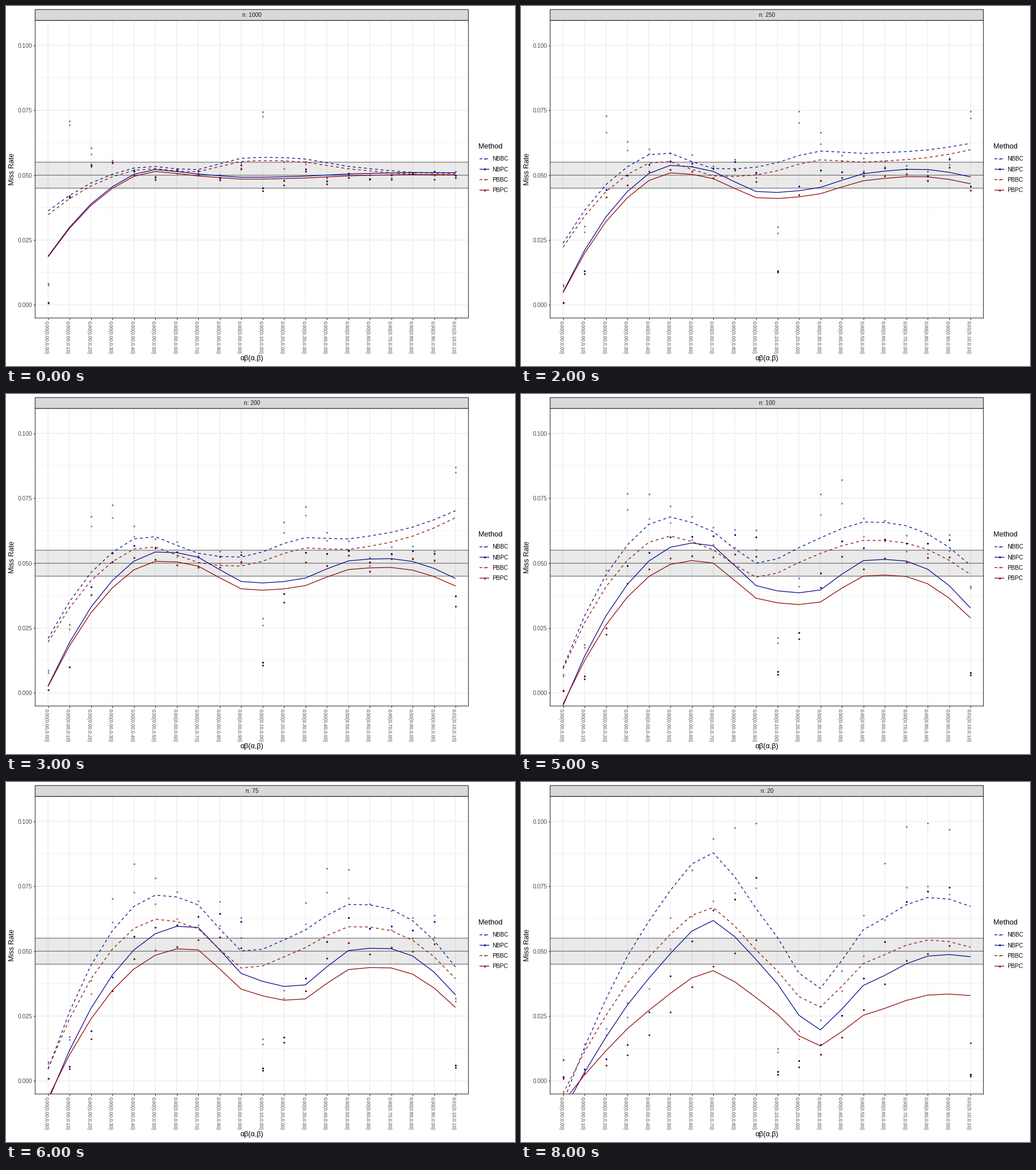
Animation of 890x629 px, one loop 9000 ms. Source, as a matplotlib script:

```python
import numpy as np
import matplotlib.pyplot as plt
from matplotlib.animation import FuncAnimation
from matplotlib.lines import Line2D
from matplotlib.patches import Rectangle

W, H, DPI = 890, 629, 100
PT = 72 / DPI  # points per pixel
LEFT, RIGHT, TOP, BOTTOM = 51.0, 808.5, 25.2, 545.1
GREY = "#333333"
plt.rcParams["font.family"] = "Liberation Sans"
plt.rcParams["path.snap"] = False

# name: colour, nonparametric bootstrap, bias corrected
METHODS = {
    "NBBC": ("#00008B", True, True),
    "NBPC": ("#00008B", True, False),
    "PBBC": ("#8B0000", False, True),
    "PBPC": ("#8B0000", False, False),
}
SIZES = [1000, 500, 250, 200, 150, 100, 75, 50, 20]
REPS = 5000

STEPS = np.arange(10) / 10
ALPHA = np.r_[np.zeros(10), STEPS[1:], 0.1]
BETA = np.r_[STEPS, np.zeros(9), 0.1]
BOTH = ALPHA * BETA > 0
X = np.arange(len(ALPHA))


def bump(z, height, centre, width):
    return height / (1 + ((z - centre) / width) ** 2)


def miss_rate(n, nonparam, corrected):
    """Expected rate: a logistic rise with effect strength, then a plateau.

    Bias correction adds a hump where the effect is just detectable.
    """
    z = np.where(BOTH, 1.28 * n * ALPHA * BETA, np.sqrt(n) * (ALPHA + BETA))
    plateau = 0.05 * (1 + (18 if nonparam else 3) / (n + 10))
    rate = plateau / (1 + np.exp(-1.75 * (z - 2.2)))
    if corrected:
        height = 0.0295 if nonparam else 0.0275
        rate += np.where(BOTH, bump(z, 0.062, 2.1, 0.96),
                         bump(z, height, 3, 1.7))
    return rate


KNOTS = np.array([-0.095, 2, 4, 7, 9, 12, 14, 17, 19.095])


def loess(y, span=0.75):
    """Local quadratic fits at the knots, blended by cubic Hermite pieces."""
    q = int(span * len(X))
    level, slope = [], []
    for k in KNOTS:
        d = np.abs(X - k)
        w = np.clip(1 - (d / np.sort(d)[q - 1]) ** 3, 0, 1) ** 1.5
        _, b, a = np.polyfit(X - k, y, 2, w=w)
        level.append(a)
        slope.append(b)
    level, slope = np.array(level), np.array(slope)
    i = np.searchsorted(KNOTS, X, side="right") - 1
    h = KNOTS[i + 1] - KNOTS[i]
    t = (X - KNOTS[i]) / h
    return (level[i] * (1 + 2 * t) * (1 - t) ** 2
            + level[i + 1] * t * t * (3 - 2 * t)
            + h * slope[i] * t * (1 - t) ** 2
            + h * slope[i + 1] * t * t * (t - 1))


def line_style(colour, dashed):
    return dict(color=colour, lw=1.22 * PT, dash_capstyle="butt",
                solid_capstyle="butt", ls=(0, (4, 4)) if dashed else "-")


def dot_style(colour, pale):
    return dict(ls="none", marker="o", ms=3.2 * PT, color=colour,
                mew=0, alpha=0.5 if pale else 1)


def label(x, y, s, size, **kw):
    kw = {"va": "center", **kw}
    return fig.text(x / W, 1 - y / H, s, fontsize=size * PT, **kw)


fig = plt.figure(figsize=(W / DPI, H / DPI), dpi=DPI, facecolor="white")
ax = fig.add_axes([LEFT / W, 1 - BOTTOM / H,
                   (RIGHT - LEFT) / W, (BOTTOM - TOP) / H])
ax.set_xlim(-0.6, 19.6)
ax.set_ylim(-0.005, 0.1096)
ax.set_axisbelow(True)
for spine in ax.spines.values():
    spine.set(color=GREY, linewidth=1.1 * PT)

ax.set_xticks(X, [])
ax.set_yticks(np.arange(5) * 0.025, [f"{v * 0.025:.3f}" for v in range(5)],
              fontsize=10.1 * PT)
ax.set_yticks(0.0125 + np.arange(4) * 0.025, minor=True)
ax.tick_params(length=3 * PT, width=1.2 * PT, pad=2 * PT,
               color=GREY, labelcolor="#4D4D4D")
ax.tick_params(which="minor", length=0)
ax.grid(color="#EBEBEB", lw=1.22 * PT)
ax.grid(which="minor", axis="y", color="#EBEBEB", lw=0.61 * PT)

# settings hang from the ticks, with their cap height touching the tick line
step = (RIGHT - LEFT) / 20.2
for i, (a, b) in enumerate(zip(ALPHA, BETA)):
    label(LEFT + (i + 0.6) * step - 3.5, 550.3,
          f"{a * b:.2f}({a:.2f},{b:.2f})", 8.55,
          rotation=270, ha="center", va="top", color="#4D4D4D")

# tolerance band
ax.axhspan(0.045, 0.055, fc=GREY, alpha=0.1, lw=0, zorder=1.5)
for level in (0.045, 0.05, 0.055):
    ax.axhline(level, color="#707070", lw=1.2 * PT, zorder=1.6)

# facet strip
fig.add_artist(Rectangle((LEFT / W, 1 - TOP / H), (RIGHT - LEFT) / W, 19 / H,
                         fc="#D9D9D9", ec=GREY, lw=1.2 * PT))
strip = label(430, 15.8, "", 10.1, ha="center", color="#1A1A1A")

label(430, 616.5, "αβ(α,β)", 12.6, ha="center")
label(11.5, 285, "Miss Rate", 12.6, ha="center", rotation=90)

label(826, 246, "Method", 12.6)
curves, dots = {}, {}
for row, (name, (colour, _, pale)) in enumerate(METHODS.items()):
    y = 267 + 18.2 * row
    fy = 1 - y / H
    line, dot = line_style(colour, pale), dot_style(colour, pale)
    fig.add_artist(Line2D([828 / W, 845 / W], [fy, fy], **line))
    fig.add_artist(Line2D([836.7 / W], [fy], **dot))
    label(850.5, y + 0.5, name, 10.1)
    curves[name], = ax.plot([], [], zorder=3, **line)
    dots[name], = ax.plot([], [], zorder=4 if pale else 5, **dot)


def draw(i):
    n = SIZES[i]
    strip.set_text(f"n: {n}")
    rng = np.random.default_rng(n)
    shared = rng.normal(size=len(X))  # all methods see the same samples
    for name, (_, nonparam, corrected) in METHODS.items():
        rate = miss_rate(n, nonparam, corrected)
        sd = np.sqrt(rate * (1 - rate) / REPS)
        noise = sd * (0.6 * shared + 0.2 * rng.normal(size=len(X)))
        curves[name].set_data(X, loess(rate))
        dots[name].set_data(X, np.maximum(rate + noise, 1 / REPS))
    return [strip, *curves.values(), *dots.values()]


anim = FuncAnimation(fig, draw, frames=len(SIZES), interval=1000,
                     init_func=lambda: draw(0), repeat=True, repeat_delay=0)
plt.show()
```
